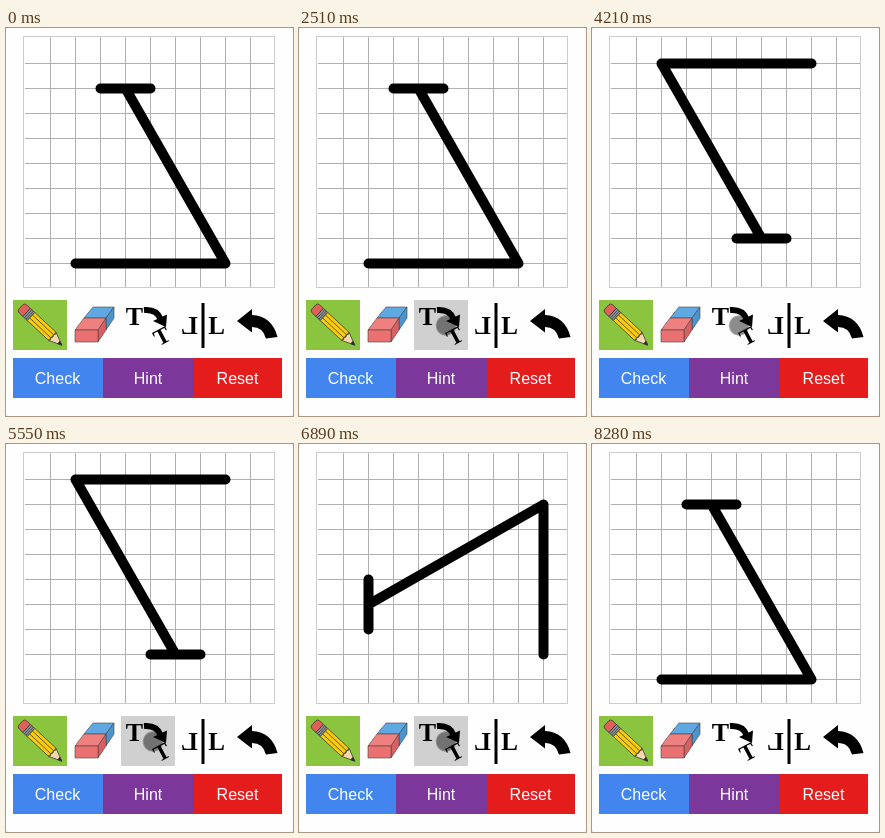
An HTML page that plays this animation: 287x388 px, repeating every 8.6 s.

```html
<!DOCTYPE html>
<html lang="en">
<head>
<meta charset="utf-8">
<title>Rotate tool</title>
<style>
  html, body { margin: 0; width: 100%; height: 100%; overflow: hidden; background: #eee; }
  svg { display: block; width: 287px; height: 388px; }
  .label { font: 16px "Liberation Sans", Arial, sans-serif; fill: #fff; text-anchor: middle; }
  .glyph { font: bold 26px "Liberation Serif", "Times New Roman", serif; fill: #000; text-anchor: middle; }
  .eraser path { stroke: #444; stroke-width: .6; stroke-linejoin: round; }
</style>
</head>
<body>
<svg viewBox="0 0 287 388">
  <defs>
    <radialGradient id="soft">
      <stop offset=".84" stop-color="#000" stop-opacity=".45"/>
      <stop offset="1" stop-color="#000" stop-opacity=".15"/>
    </radialGradient>
  </defs>
  <rect width="287" height="388" rx="4" fill="#fefefe"/>
  <rect x="17.5" y="8.5" width="251" height="251" fill="#fff" stroke="#ccc"/>
  <path id="grid" stroke="#b0b0b0" fill="none"/>
  <path id="figure" stroke="#000" stroke-width="10" stroke-linecap="round" stroke-linejoin="round" fill="none"/>

  <rect x="7" y="272" width="54" height="50" fill="#8bc53f"/>
  <rect id="press" x="115" y="272" width="54" height="50" fill="#000" fill-opacity=".18"/>

  <g transform="translate(17 281) rotate(43)" stroke="#333" stroke-width=".7" stroke-linejoin="round">
    <path d="M0-5.5H5V5.5H0Q-3 5.5-3 3V-3Q-3-5.5 0-5.5Z" fill="#e0605c"/>
    <path d="M5-5.5H11V5.5H5Z" fill="#8d9499"/>
    <path d="M7-5.5V5.5M9-5.5V5.5" fill="none"/>
    <path d="M11-5.5H40V5.5H11Z" fill="#fccb0a"/>
    <path d="M11-2H40M11 2H40" fill="none"/>
    <path d="M40-5.5L53 0L40 5.5Q42 3.5 40 2Q42 0 40-2Q42-3.5 40-5.5Z" fill="#f6d7b0"/>
    <path d="M49-1.7L53 0L49 1.7Z" fill="#222"/>
  </g>

  <g class="eraser">
    <path d="M78 290L87 279H108L100 290Z" fill="#5fa9e2"/>
    <path d="M100 290L108 279V290L100 302Z" fill="#4a94d0"/>
    <path d="M69 302L78 290H100L92 302Z" fill="#f08080"/>
    <path d="M92 302L100 290V302L92 314Z" fill="#d95f60"/>
    <path d="M69 302H92V314H69Z" fill="#ea7072"/>
  </g>

  <text class="glyph" x="128.5" y="297">T</text>
  <text class="glyph" transform="translate(159.5 315) rotate(-28)" style="font-size:23px">T</text>
  <path d="M138 282Q151 281 154.500 291" fill="none" stroke="#000" stroke-width="6"/>
  <path d="M147 293L161 286.500L160 299Z"/>

  <path d="M197 275V320" stroke="#000" stroke-width="3"/>
  <text class="glyph" x="210.500" y="306" style="font-size:25px">L</text>
  <text class="glyph" transform="translate(183.500 306) scale(-1 1)" style="font-size:25px">L</text>

  <path d="M231 293L246 281V287Q266 288 271.500 309L260 310.500Q257 299 246 299V304.500Z"/>

  <rect x="7" y="330" width="90" height="40" fill="#4285ee"/>
  <rect x="97" y="330" width="91" height="40" fill="#7b3799"/>
  <rect x="188" y="330" width="88" height="40" fill="#e41c1c"/>
  <text class="label" x="51.500" y="356">Check</text>
  <text class="label" x="142" y="356">Hint</text>
  <text class="label" x="231.500" y="356">Reset</text>

  <circle id="touch" r="10.500" fill="url(#soft)"/>
</svg>
<script>
  const LOOP = 8600;
  const el = id => document.getElementById(id);
  const grid = el("grid"), figure = el("figure"), press = el("press"), touch = el("touch");

  let lines = "";
  for (let i = 1; i < 10; i++) {
    const n = 25 * i;
    lines += `M${19.5 + n} 9V259M19 ${10.5 + n}H268`;
  }
  grid.setAttribute("d", lines);
  figure.setAttribute("transform", "translate(.5 .5)");

  const upright = "M94 60H144M119 60L219 235H69";
  const poses = [
    [0, upright],
    [2630, "M44 60V210L219 110M219 85V135"],
    [4210, "M219 35H69L169 210M144 210H194"],
    [5680, "M69 135V185M69 160L244 60V210"],
    [7010, upright]
  ];

  const taps = [[0, 0], [2510, 1], [2630, 0], [5550, 1], [5680, 0], [6890, 1], [7010, 0]];

  // Pointer positions; null means the pointer is off the page.
  const pointer = [
    [0, null],
    [950, [106.5, 327.5]], [1070, [131, 301]], [1190, [148.5, 279.5]],
    [1340, [151.5, 289]], [1460, [147, 297.5]],
    [1850, [147, 305.5]], [1970, [147, 297.5]],
    [7410, [172, 318]], [7530, [217, 350]], [7650, [256.5, 377.5]],
    [7790, null],
    [8160, [244.5, 384.5]], [8280, null]
  ];

  function at(steps, t) {
    let value = steps[0][1];
    for (const [time, v] of steps) if (t >= time) value = v;
    return value;
  }

  function draw(t) {
    figure.setAttribute("d", at(poses, t));
    press.setAttribute("opacity", at(taps, t));
    const p = at(pointer, t);
    touch.setAttribute("opacity", p ? 1 : 0);
    if (p) {
      touch.setAttribute("cx", p[0]);
      touch.setAttribute("cy", p[1]);
    }
  }

  const start = performance.now();
  function tick() {
    draw((performance.now() - start) % LOOP);
    requestAnimationFrame(tick);
  }
  tick();
</script>
</body>
</html>
```
